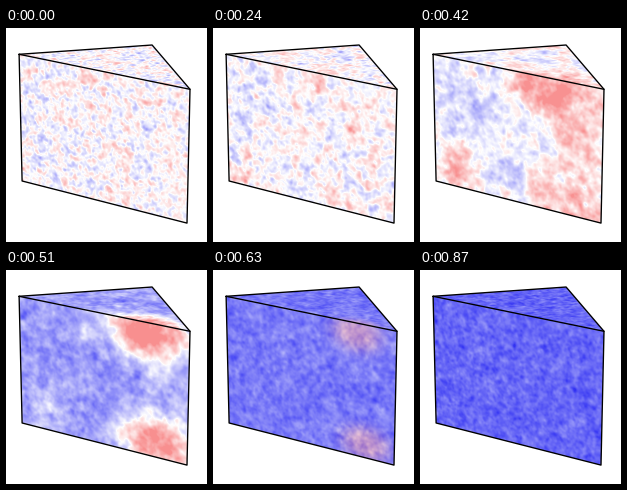
A matplotlib script that plays this animation: 201 px wide and 214 px high, repeating every 900 ms.

```python
import numpy as np
import matplotlib.pyplot as plt
from matplotlib.animation import FuncAnimation

W, H, FRAMES, STEP = 201, 214, 30, 30
LEFT, BACK, RIGHT = (13.1, 26.3), (146.1, 17), (184, 61.3)
FRONT = [LEFT, RIGHT, (181, 195.1), (16.1, 153)]
WIDE, TALL, DEEP, GRID = 180, 127, 90, 256
CRITICAL, FROZEN = 14, 24  # frames where order sets in and the last red is gone


def homography(src, dst):
    """Projective map taking four src points to four dst points."""
    rows, rhs = [], []
    for (x, y), (u, v) in zip(src, dst):
        rows += [[x, y, 1, 0, 0, 0, -u * x, -u * y],
                 [0, 0, 0, x, y, 1, -v * x, -v * y]]
        rhs += [u, v]
    return np.append(np.linalg.solve(rows, rhs), 1).reshape(3, 3)


def smoothstep(x, lo, hi):
    t = np.clip((x - lo) / (hi - lo), 0, 1)
    return t * t * (3 - 2 * t)


def pulse(x, centre, width):
    return np.exp(-((x - centre) / width) ** 2)


# Surface coordinates of every pixel: the front lies at v > 0, the top at v < 0
px, py = np.meshgrid(np.arange(W) + 0.5, np.arange(H) + 0.5)
pixels = np.stack([px, py, np.ones_like(px)])
fu, fv, fw = np.tensordot(
    homography(FRONT, [(0, 0), (WIDE, 0), (WIDE, TALL), (0, TALL)]), pixels, 1)
fu, fv = fu / fw, fv / fw
corners = np.array([[*LEFT, 1], [*BACK, 1], [*RIGHT, 1]])
top_map = np.linalg.solve(corners, [[0, 0], [WIDE / 2, -DEEP], [WIDE, 0]]).T
tu, tv = np.tensordot(top_map, pixels, 1)
on_front = (fu >= 0) & (fu <= WIDE) & (fv >= 0) & (fv <= TALL)
on_top = (tv < 0) & (tv >= -2 * DEEP * np.minimum(tu, WIDE - tu) / WIDE)
inside = on_front | on_top
U = np.where(inside, np.where(on_top, tu, fu), 0)
V = np.where(inside, np.where(on_top, tv, fv), 0)


def bump(x, y, r, stretch=1.0, power=2):
    """Soft spot on the surface around the pixel (x, y)."""
    d = np.hypot((U - U[y, x]) / stretch, V - V[y, x])
    return np.exp(-(d / r) ** power)


# Domains that form while cooling, then two red pockets that shrink
BLUE = np.maximum(bump(57, 80, 30), bump(92, 142, 18))
RED = np.max([bump(116, 68, 20), bump(157, 108, 27), bump(38, 138, 20)], axis=0)
POCKETS = [(143, 62), (152, 174)]

freq = np.fft.fftfreq(GRID)
K = np.hypot(freq[:, None], freq[None, :])


def noise_history():
    """White noise spectra in which small details are forgotten sooner."""
    rng = np.random.default_rng(11)

    def fresh():
        return np.fft.fft2(rng.standard_normal((GRID, GRID)))

    keep = np.exp(-12 * K)
    state, out = fresh(), []
    for _ in range(FRAMES):
        out.append(state)
        state = keep * state + np.sqrt(1 - keep ** 2) * fresh()
    return out


SPECTRA = noise_history()


def sample(tex):
    """Bilinear lookup of the periodic texture on both faces."""
    i, j = np.floor(V).astype(int), np.floor(U).astype(int)
    a, b = V - i, U - j

    def at(di, dj):
        return tex[(i + di) % GRID, (j + dj) % GRID]

    return ((1 - a) * ((1 - b) * at(0, 0) + b * at(0, 1))
            + a * ((1 - b) * at(1, 0) + b * at(1, 1)))


def noise(n):
    """Clouds whose grain is largest at the critical point."""
    grain = 10 + 16 * pulse(n, CRITICAL, 6)
    shape = (K ** 2 + grain ** -2.0) ** -0.85 * np.exp(-(3 * K) ** 2)
    shape[0, 0] = 0
    tex = np.fft.ifft2(SPECTRA[n] * shape).real
    return sample(tex / tex.std())


def render(n):
    order = 0.6 * (1 - np.exp(-max(n - CRITICAL, 0) / 3.5))
    level = 0.1 - 0.045 * smoothstep(n, 12, 22)
    s = level * noise(n) - order + 0.26 * pulse(n, 13, 4) * (RED - BLUE)

    left = np.clip((FROZEN - n) / 7, 0, 1)
    stain = 0
    if left > 0:
        radius = 27 * np.sqrt(left)
        pockets = np.max([bump(x, y, radius, 1.45, 3) for x, y in POCKETS], axis=0)
        s += 0.78 * left * smoothstep(n, 12, 17) * pockets
        stain = 0.18 * pulse(n, 21, 2.2) * pockets
    s = np.clip(s, -0.8, 0.43)

    # Red shows through the last blue as a mauve stain
    red, blue = np.maximum(s, 0) + stain, np.maximum(-s, 0)
    rgb = np.stack([1 - blue - 0.06 * red, 1 - red - blue,
                    1 - red - 0.06 * blue], axis=-1)
    rgb[~inside] = 1
    return np.clip(rgb, 0, 1)


# A power-of-two dpi keeps the pixel size exact
DPI = 64
fig = plt.figure(figsize=(W / DPI, H / DPI), dpi=DPI, facecolor="white")
ax = fig.add_axes([0, 0, 1, 1])
ax.axis("off")
image = ax.imshow(render(0), extent=(0, W, H, 0), interpolation="nearest",
                  aspect="auto")
for path in (FRONT + [LEFT], [LEFT, BACK, RIGHT]):
    ax.plot(*zip(*path), color="black", lw=1.35 * 72 / DPI,
            solid_joinstyle="round", solid_capstyle="round")
ax.set_xlim(0, W)
ax.set_ylim(H, 0)


def update(n):
    image.set_data(render(n))
    return [image]


anim = FuncAnimation(fig, update, frames=FRAMES, interval=STEP, repeat=True,
                     repeat_delay=0)
plt.show()
```
